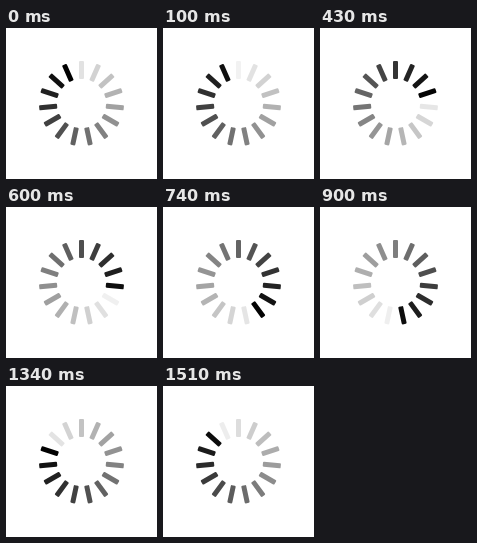
Write an HTML page that moves like this. It is 151 px wide and 151 px high and loops after 1.54 s.

```html
<!DOCTYPE html>
<html>
<head>
<meta charset="utf-8">
<style>
  html, body { margin: 0; height: 100%; overflow: hidden; background: #fff; }
  svg { display: block; width: 100vw; height: 100vh; }
</style>
</head>
<body>
<svg viewBox="0 0 151 151"></svg>
<script>
const LOOP = 1540, STEPS = 46, SPOKES = 15;
const FAINTEST = 0.05;
const svg = document.querySelector('svg');

const spokes = Array.from({ length: SPOKES }, (_, i) => {
  const spoke = document.createElementNS('http://www.w3.org/2000/svg', 'rect');
  const attributes = {
    x: 73, y: 33, width: 5, height: 18, rx: 1,
    transform: `rotate(${i * 360 / SPOKES} 75.5 75.5)`
  };
  for (const name in attributes) spoke.setAttribute(name, attributes[name]);
  return svg.appendChild(spoke);
});

function draw() {
  const time = performance.now() % LOOP;
  const turn = Math.floor((time + 6) / LOOP * STEPS) % STEPS / STEPS;
  spokes.forEach((spoke, i) => {
    // Each spoke jumps to black as the head passes, then fades for one turn.
    const age = (turn + 1 - (i + 1) % SPOKES / SPOKES) % 1;
    spoke.setAttribute('opacity', 1 - (1 - FAINTEST) * age);
  });
  requestAnimationFrame(draw);
}
draw();
</script>
</body>
</html>
```
